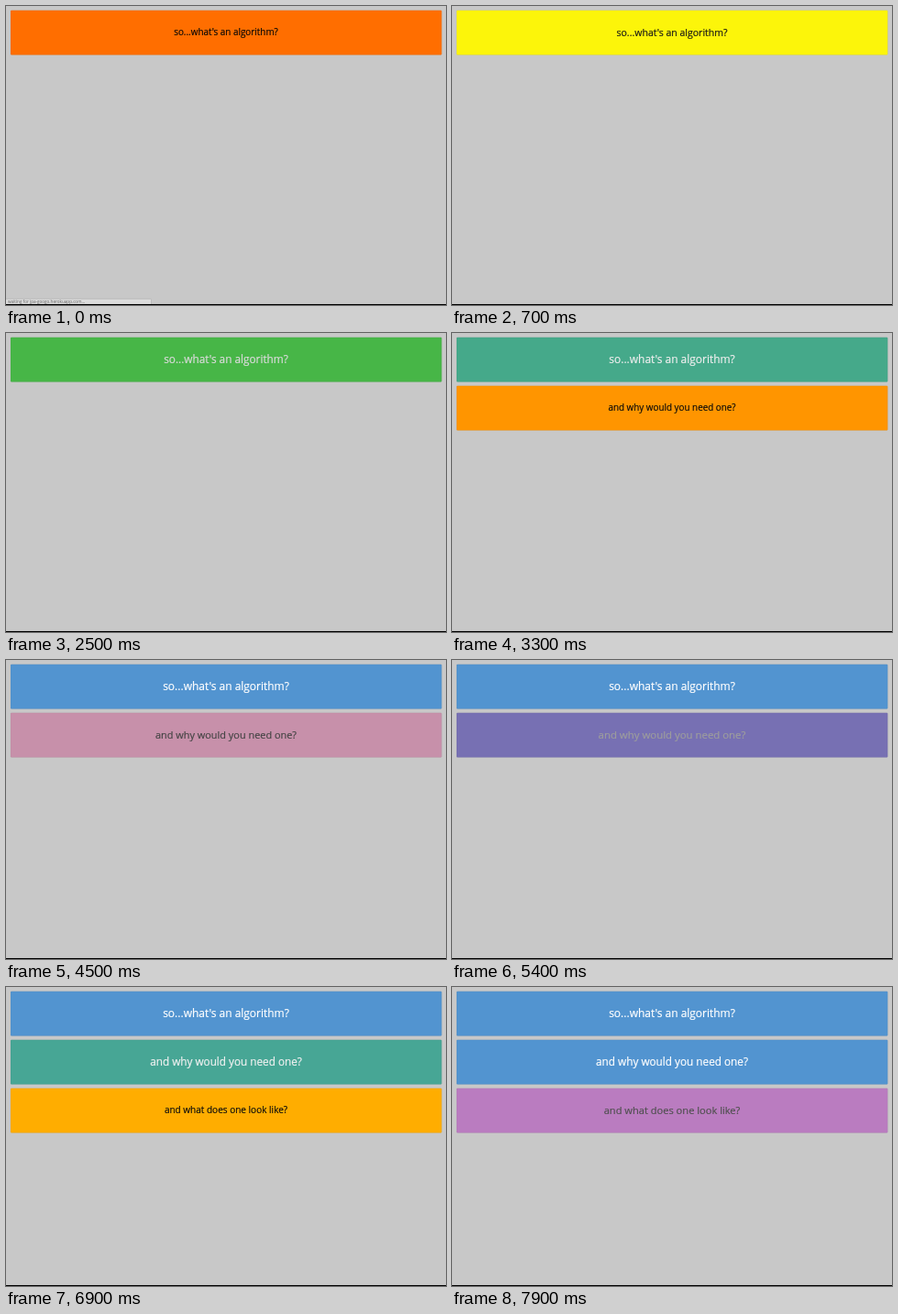
An HTML page for the animation above (8 s loop, 480 by 327 pixels).

```html
<!DOCTYPE html>
<html lang="en">
<head>
<meta charset="utf-8">
<title>Algorithm questions</title>
<style>
  html, body { margin: 0; width: 100%; height: 100%; overflow: hidden; background: #c8c8c8; }
  svg { display: block; width: 480px; height: 327px; }
  text { font-family: "Open Sans", "Noto Sans", sans-serif; }
  .line text { text-anchor: middle; stroke-width: .2; }
  .line rect { stroke: #000; stroke-opacity: .08; stroke-width: .6; }
  #status text { font-size: 4.6px; fill: #666; }
</style>
</head>
<body>
<svg viewBox="0 0 480 327">
  <rect width="480" height="327" fill="#c8c8c8"/>
  <g id="lines"></g>
  <g id="status">
    <rect x="-1" y="320.3" width="159.5" height="7" rx="1" fill="#dcdcdc" stroke="#aaa" stroke-width=".6"/>
    <text x="2" y="325">waiting for jpa-googo.herokuapp.com...</text>
  </g>
  <rect y="326" width="480" height="1" fill="#000"/>
</svg>
<script>
const LOOP = 8000, STEP = 100;

// progress, fill, text grey, text scale
const STOPS = [
  [0,    [255, 38, 0],    0,   .8],
  [1,    [255, 251, 0],   20,  .875],
  [1.6,  [196, 138, 179], 70,  .932],
  [2,    [148, 69, 245],  120, .96],
  [2.88, [71, 182, 71],   218, .986],
  [3,    [60, 200, 0],    220, .993],
  [3.66, [69, 169, 138],  238, .998],
  [4,    [82, 148, 208],  255, 1]
];

// times: when each line reaches progress 0, 1, 2, 3 and 4
const LINES = [
  { text: "so...what's an algorithm?", size: 11.98, times: [-340, 660, 1870, 2586, 3668] },
  { text: "and why would you need one?", size: 11.76, times: [2760, 3800, 5028, 6150, 7200] },
  { text: "and what does one look like?", size: 11.84, times: [6290, 7250, 8206, 9300, 10400] }
];
const STATUS = [[0, 200], [2600, 3100], [6300, 6700]];

const mix = (a, b, f) => a + (b - a) * f;

function add(parent, name, attrs) {
  const el = document.createElementNS("http://www.w3.org/2000/svg", name);
  for (const key in attrs) el.setAttribute(key, attrs[key]);
  return parent.appendChild(el);
}

LINES.forEach((line, i) => {
  line.mid = 29.1 + i * 53;
  line.group = add(document.getElementById("lines"), "g", { class: "line" });
  line.box = add(line.group, "rect", { x: 5, y: line.mid - 24.3, width: 470.3, height: 48.6, rx: 1 });
  line.label = add(line.group, "text", { y: 3.9, "font-size": line.size });
  line.label.textContent = line.text;
});

function progress(times, t) {
  if (t >= times[4]) return 4;
  const i = times.findIndex(end => t < end) - 1;
  return i + (t - times[i]) / (times[i + 1] - times[i]);
}

function paint(line, t) {
  const shown = t >= line.times[0];
  line.group.setAttribute("visibility", shown ? "visible" : "hidden");
  if (!shown) return;
  const p = progress(line.times, t);
  const i = Math.max(1, STOPS.findIndex(s => p <= s[0]));
  const [p0, c0, g0, s0] = STOPS[i - 1];
  const [p1, c1, g1, s1] = STOPS[i];
  const f = (p - p0) / (p1 - p0);
  const grey = Math.round(mix(g0, g1, f));
  const ink = `rgb(${grey},${grey},${grey})`;
  line.box.setAttribute("fill", `rgb(${c0.map((c, k) => Math.round(mix(c, c1[k], f)))})`);
  line.label.setAttribute("fill", ink);
  line.label.setAttribute("stroke", ink);
  line.label.setAttribute("transform", `translate(240 ${line.mid}) scale(${mix(s0, s1, f)})`);
}

const status = document.getElementById("status");
const start = performance.now();

function draw() {
  const elapsed = Math.max(0, performance.now() - start) % LOOP;
  const t = Math.floor(elapsed / STEP) * STEP;
  LINES.forEach(line => paint(line, t));
  const waiting = STATUS.some(([from, to]) => t >= from && t < to);
  status.setAttribute("visibility", waiting ? "visible" : "hidden");
  requestAnimationFrame(draw);
}
draw();
</script>
</body>
</html>
```
